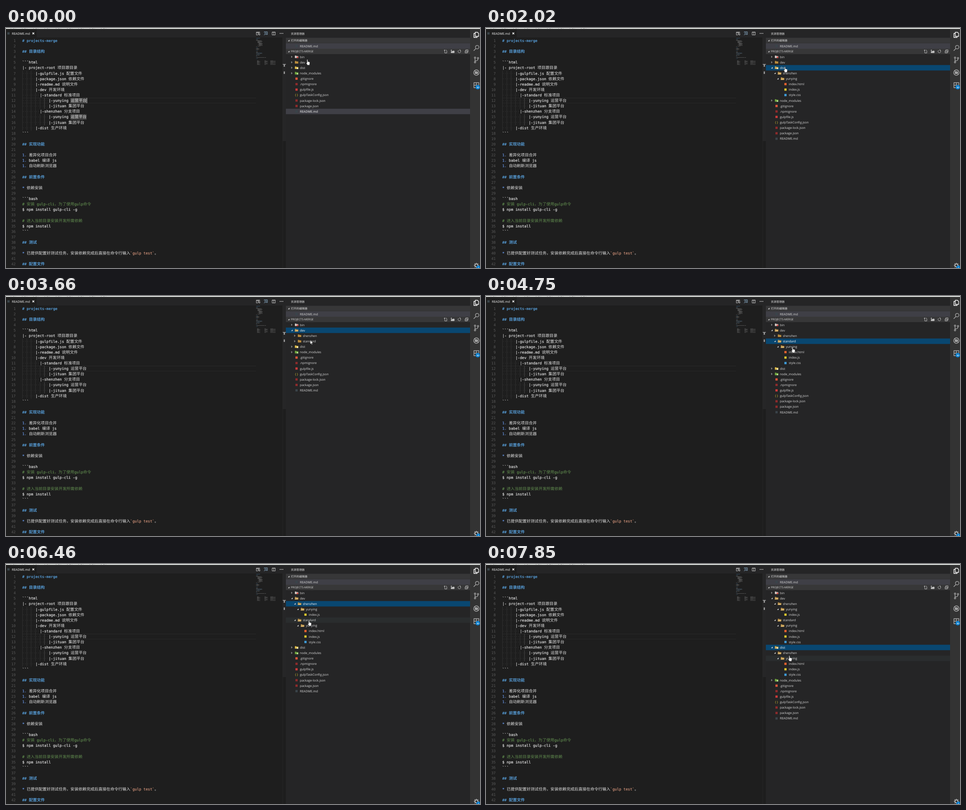
An HTML page for the animation above (7.99 s loop, 1050 px wide and 533 px high).

```html
<!DOCTYPE html>
<html lang="zh">
<head>
<meta charset="utf-8">
<title>projects-merge</title>
<style>
html, body { margin: 0; width: 100%; height: 100%; overflow: hidden; background: #1e1e1e; }
svg { display: block; }
text { white-space: pre; text-rendering: geometricPrecision; }
.code { font: 8.1px "DejaVu Sans Mono", monospace; }
.code .cjk { font: 8.83px "Noto Sans CJK SC", "Noto Sans CJK", sans-serif; }
.code .bold { font-weight: bold; }
.ui { font: 6.88px "Open Sans", "Noto Sans CJK SC", "Noto Sans CJK", sans-serif; }
.small { font-size: 6.1px; }
.line { fill: none; stroke: #c5c5c5; stroke-width: .9; }
</style>
</head>
<body>
<svg id="stage" width="1050" height="533" viewBox="0 0 1050 533"></svg>
<script>
const LOOP = 7990, PITCH = 12.13, COL = 4.876, LEFT = 36;
const BLUE = "#569cd6", TEXT = "#e2e2e2", UI = "#dcdcdc", NOTE = "#3a444a";
const stage = document.getElementById("stage");

function add(parent, tag, attrs, content) {
  const el = document.createElementNS("http://www.w3.org/2000/svg", tag);
  for (const k in attrs) el.setAttribute(k, attrs[k]);
  if (content !== undefined) el.textContent = content;
  parent.appendChild(el);
  return el;
}
const rect = (p, x, y, width, height, fill, more) => add(p, "rect", { x, y, width, height, fill, ...more });
const path = (p, d, attrs) => add(p, "path", { d, ...attrs });
const label = (p, x, y, s, fill = UI, cls = "") => add(p, "text", { x, y: y + 2.5, fill, class: "ui " + cls }, s);
const at = (p, x, y) => add(p, "g", { transform: `translate(${x} ${y})` });
const lineY = n => 28 + (n - 1) * 12.11;

// Title strip and tab bar
rect(stage, 0, 0, 1050, 533, "#1e1e1e");
rect(stage, 0, 2, 620, 19, "#252526");
rect(stage, 0, 2, 68, 19, "#1e1e1e");
rect(stage, 0, 0, 1050, 2, "#e9ece9");
path(stage, "M10 .6H222", { stroke: "#a5a8a5", "stroke-width": .8, "stroke-dasharray": "2 3 4 2 1 13" });
rect(stage, 3, 9.5, 5, 5, NOTE);
label(stage, 13, 12, "README.md", "#fff");
path(stage, "M58.5 10l4 4m0-4l-4 4", { class: "line", style: "stroke:#fff;stroke-width:1.2" });

// Editor actions
path(stage, "M554.5 9h7.5v2m-7.5-2v6.5h3.5m-3.5-5h7M558.5 9v6M560 12.5h2.5v3h-2.5z", { class: "line" });
const preview = at(stage, 575, 12);
path(preview, "M-3-2v-1.5h7v6h-2M-3.5 4l2.5-2.5", { class: "line", style: "stroke:#8fb4d0" });
add(preview, "circle", { cx: .3, cy: .3, r: 1.9, class: "line", style: "stroke:#8fb4d0" });
path(stage, "M589.5 9h7v6.5h-7zM593 9v6.5M589.5 9.5h7", { class: "line" });
for (const x of [607.3, 610.3, 613.3]) add(stage, "circle", { cx: x, cy: 12, r: .9, fill: "#d0d0d0" });

// Document
const doc = `# projects-merge

## 目录结构

\`\`\`html
|- project-root 项目跟目录
      |-gulpfile.js 配置文件
      |-package.json 依赖文件
      |-readme.md 说明文件
      |-dev 开发环境
        |-standard 标准项目
            |-yunying 运营平台
            |-jituan 集团平台
        |-shenzhen 分支项目
            |-yunying 运营平台
            |-jituan 集团平台
      |-dist 生产环境
\`\`\`

## 实现功能

1. 差异化项目合并
1. babel 编译 js
1. 自动刷新浏览器

## 前置条件

* 依赖安装

\`\`\`bash
# 安装 gulp-cli，为了使用gulp命令
$ npm install gulp-cli -g

# 进入当前目录安装开发所需依赖
$ npm install
\`\`\`

## 测试

* 已提供配置好测试任务，安装依赖完成后直接在命令行输入\`gulp test\`。

## 配置文件`.split("\n");

function segments(s, n) {
  if (n > 30 && n < 36 && s[0] === "#") return [[s, "#608b4e"]];
  if (s[0] === "#") return [[s, BLUE, "bold"]];
  const item = s.match(/^(1\.|\*)(.*?)(`.*`)?(。?)$/);
  if (item) return [[item[1], "#6796e6"], [item[2], TEXT], [item[3] || "", "#ce9178"], [item[4], TEXT]];
  return [[s, TEXT]];
}

for (const y of [155, 166.4]) rect(stage, LEFT, y, 518, .8, "#2c2c2c");
const marks = add(stage, "g", {});
for (const n of [12, 15]) rect(marks, 142.8, lineY(n) - 6, 35.6, 12, "#464646");

doc.forEach((s, i) => {
  const n = i + 1, y = lineY(n), indent = s.search(/\S|$/);
  add(stage, "text", { x: 21.5, y: y + 2.9, class: "code", fill: "#5a5a5a", "text-anchor": "end" }, n);
  for (let c = 0; c < indent; c++) {
    const x = LEFT + c * COL;
    rect(stage, x + 2, y - .4, .9, .9, "#444");
    if (c % 2 === 0) rect(stage, x, y - 6, .6, 12.1, c === 10 ? "#686868" : "#3c3c3c");
  }
  const t = add(stage, "text", { x: LEFT + indent * COL, y: y + 2.9, class: "code" });
  for (const [str, fill, weight = ""] of segments(s.trim(), n))
    for (const part of str.split(/([^\x00-\x7f]+)/)) {
      if (!part) continue;
      const latin = part < "\x7f";
      add(t, "tspan", {
        fill, class: (latin ? "" : "cjk ") + weight,
        stroke: latin && !weight ? fill : "none", "stroke-width": .2
      }, part);
    }
});
const caret = rect(stage, 178.6, 155.2, 1, 11.8, "#ddd");

// Minimap
const tail = Array.from({ length: 9 }, (_, i) =>
  "    " + "x".repeat(5 + i % 3 * 4).padEnd(30) + (i % 4 ? "xxx xxxx xxx" : "xxxxx").padEnd(24) +
  (i % 3 ? "xxxx xx xxx xxxx xxx" : "xxxx xxxxx"));
[...doc, "", "", "", ...tail].forEach((s, i) => {
  for (const word of s.matchAll(/\S+/g))
    rect(stage, 554 + word.index * .55, 22 + i * 1.11, word[0].length * .55, .7,
      s[0] === "#" ? BLUE : "#bbb", { opacity: i < doc.length ? .45 : .38 });
});

// Scrollbar and overview marks
rect(stage, 613, 21, 7, 230, "#262627");
rect(stage, 612.8, 21, .5, 512, "#343434");
rect(stage, 613, 80, 7, 1.2, "#b0b0b0");
rect(stage, 615.2, 80, 2.6, 6, "#a0a0a0");
rect(stage, 615.2, 96.5, 2.6, 5.5, "#a0a0a0");

// Sidebar
rect(stage, 620, 2, 408, 531, "#252526");
label(stage, 631, 12.5, "资源管理器", UI, "small");
for (const [y, s] of [[27.7, "打开的编辑器"], [52, "PROJECTS-MERGE"]]) {
  rect(stage, 620, y - 6, 408, 12, "#373738");
  path(stage, `M628 ${y - 1.6}v3.4h-3.4z`, { fill: "#ddd" });
  label(stage, 631, y - .2, s, UI, "small");
}
rect(stage, 620, 34, 408, 12, "#3f3f46");
rect(stage, 641, 37.5, 5, 5, NOTE);
label(stage, 651, 40, "README.md");

path(at(stage, 974, 52), "M-2-1v4.5h4.5v-5l-1.5-1.5h-1M-4-2.5h3M-2.5-4v3", { class: "line" });
path(at(stage, 989, 52), "M-3 0h3l1-1h3v4h-7zM-4-2.5h3M-2.5-4v3", { class: "line", style: "fill:#c5c5c5" });
path(at(stage, 1004.5, 52), "M1-2.6a3 3 0 1 1-2.5 0M1-4.5v2.5h2", { class: "line" });
path(at(stage, 1020, 52), "M-3-1h5v4.5h-5zM-1.5-1v-2.5h5v5h-1.5M-1.8 1.3h2.6", { class: "line" });

// Activity bar
rect(stage, 1028, 2, 22, 531, "#333");
const ring = (x, y, r) => `M${x - r} ${y}a${r} ${r} 0 1 0 ${2 * r} 0a${r} ${r} 0 1 0 ${-2 * r} 0`;
const tool = (y, d, color = "#adadad") =>
  path(at(stage, 1042, y), d, { class: "line", style: `stroke:${color};stroke-width:1.3` });
tool(15, "M-2.5-5.5h5l2.5 2.5v6.5h-7.5zM-2.5-3h-3v9h7v-2.5", "#fff");
tool(44, "M-1 1.5l-5 5" + ring(1.7, -1.5, 3.9));
tool(71, "M-3-3v6M3.5-2q0 4-6 4" + ring(-3, -5, 1.6) + ring(-3, 5, 1.6) + ring(3.5, -4, 1.6));
tool(99, "M-4-4l8 8M-4 0h8M-3.5 3l7-5" + ring(0, 0, 6) + ring(0, 0, 2.4));
tool(127, "M-5.5-5.5h11v11h-11zM-5.5 0h11M0-5.5v11");
tool(527, "M0-5.5v2.5M0 3v2.5M-5.5 0h2.5M3 0h2.5M-4-4l2 2M4-4l-2 2M-4 4l2-2M4 4l-2-2" + ring(0, 0, 3), "#c8c8c8");
for (const [x, y, r, s] of [[1045, 131.5, 5, "30"], [1046.5, 532, 4.5, "1"]]) {
  add(stage, "circle", { cx: x, cy: y, r, fill: "#007acc" });
  add(stage, "text", { x, y: y + 2, class: "ui", fill: "#fff", "text-anchor": "middle", style: "font-size:5.4px;font-weight:600" }, s);
}

// Explorer tree
const web = ["index.html", "index.js", "style.css"];
const dir = (name, ...kids) => ({ name, kids });
const files = [
  dir("bin"),
  dir("dev", dir("shenzhen", dir("yunying", "index.js")), dir("standard", dir("yunying", ...web))),
  dir("dist", dir("shenzhen", dir("yunying", ...web))),
  dir("node_modules"),
  ".gitignore", ".npmignore", "gulpfile.js", "gulpTaskConfig.json", "package-lock.json", "package.json", "README.md"
];
const folderColor = { bin: "#cfc6c2", dist: "#dcb944", node_modules: "#6fa53c" };
const badge = { bin: "#d9443f", dist: "#f4ecc8", node_modules: "#b7d99a" };
const fileColor = {
  ".gitignore": "#e0563a", ".npmignore": "#8e2b2c", "gulpfile.js": "#c93a3a", "package-lock.json": "#8e2b2c",
  "package.json": "#8e2b2c", "README.md": NOTE, "index.html": "#e4602f", "index.js": "#d9c52f", "style.css": "#3f9bd8"
};

// time, open folders, selected row, hovered row
const states = [
  [0, [], "README.md"],
  [1370, ["dist"], "dist"],
  [2270, [], "dist"],
  [2900, ["dev"], "dev"],
  [3800, ["dev", "dev/standard"], "dev/standard"],
  [5280, ["dev", "dev/standard", "dev/shenzhen"], "dev/shenzhen"],
  [5540, ["dev", "dev/standard", "dev/shenzhen"], "dev/shenzhen", "dev/standard"],
  [7300, ["dev", "dev/standard", "dev/shenzhen", "dist"], "dist"],
  [7560, ["dev", "dev/standard", "dev/shenzhen", "dist"], "dist", "dist/shenzhen/yunying"]
];

function drawFolder(g, name, open) {
  const fill = folderColor[name] || (open ? "#c89b4c" : "#b98a3c");
  path(g, "M-3.7-2.8h2.8l1 1h3.8v4.6h-7.6z", { fill });
  if (open) path(g, "M-4.3 2.8l1.4-3.4h7.2l-1.2 3.4z", { fill: "#e3bd74", stroke: "#5a4520", "stroke-width": .4 });
  if (badge[name]) rect(g, .5, -.3, 3.2, 3.2, badge[name]);
}

function drawTree(g, open, selected, hovered) {
  let y = 64;
  const isOpen = p => p.endsWith("yunying") || p === "dist/shenzhen" || open.includes(p);
  (function rows(nodes, depth, base) {
    for (const node of nodes) {
      const name = node.name || node, id = base + name, x = depth * 6.6;
      if (id === selected) rect(g, 620, y - 6, 408, 12.1, id === "README.md" ? "#3f3f46" : "#094771");
      else if (id === hovered) rect(g, 620, y - 6, 408, 12.1, "#2a2d2e");
      const icon = at(g, 643.6 + x, y);
      if (node.kids) {
        const arrow = at(g, 633 + x, y);
        if (isOpen(id)) path(arrow, "M2-1.7v3.4h-3.4z", { fill: "#ddd" });
        else path(arrow, "M-.8-2l2 2l-2 2z", { fill: "#777", stroke: "#bbb", "stroke-width": .5 });
        drawFolder(icon, name, isOpen(id));
      } else if (name === "gulpTaskConfig.json") {
        add(icon, "text", { y: 2.4, class: "ui", fill: "#d9c52f", "text-anchor": "middle" }, "{ }");
      } else {
        rect(icon, -2.5, -2.5, 5, 5, fileColor[name]);
      }
      label(g, 651 + x, y, name, id === selected ? "#fff" : UI);
      y += PITCH;
      if (node.kids && isOpen(id)) rows(node.kids, depth + 1, id + "/");
    }
  })(files, 0, "");
}
const trees = states.map(([, ...args]) => {
  const g = add(stage, "g", {});
  drawTree(g, ...args);
  return g;
});

// Pointer
const ink = { fill: "#fff", stroke: "#222", "stroke-width": .6 };
const pointer = add(stage, "g", {});
const hand = path(pointer, "M2.2.8q.9-.8 1.8 0v4.2l3.6.9q1.1.3 1 1.6l-.7 5.4h-4.6l-2.8-4.5q.1-1.3 1.7-.1z", ink);
const arrow = path(pointer, "M0 0v9l2-1.8 1.5 3 1.3-.6-1.5-2.9h2.9z", ink);

// time, x, y: jumps toward the next point in short steps
const track = [
  [0, 664.5, 69.5], [150, 664.5, 69.5], [420, 667, 100], [685, 667, 100], [820, 666, 105],
  [940, 666, 105], [1230, 659, 87], [1640, 660, 86], [1890, 660, 86], [2020, 659, 85.5],
  [2270, 659, 85.5], [2760, 658, 74], [3050, 660, 76], [3660, 674, 98], [3800, 674, 98],
  [4100, 676, 113], [4750, 676, 113], [5150, 668, 85], [5280, 668, 85], [5680, 670, 121],
  [5960, 674, 102], [6180, 680, 136], [6460, 668, 124.5], [6610, 668, 124.5], [6740, 660, 167],
  [7160, 658, 183], [7300, 658, 183], [7850, 669, 203], [LOOP, 669, 203]
];

function pointerAt(t) {
  const i = track.findIndex(k => k[0] > t);
  const [t0, x0, y0] = track[i - 1], [t1, x1, y1] = track[i];
  const steps = Math.max(1, Math.round((t1 - t0) / 137));
  const p = Math.floor((t - t0) / (t1 - t0) * steps) / steps;
  return [x0 + (x1 - x0) * p, y0 + (y1 - y0) * p];
}

const show = (el, on) => el.setAttribute("visibility", on ? "visible" : "hidden");
const between = (t, a, b) => t >= a && t < b;

function draw(now) {
  const t = now % LOOP;
  trees.forEach((g, i) => show(g, between(t, states[i][0], i + 1 < states.length ? states[i + 1][0] : LOOP)));
  show(marks, t < 1370);
  show(caret, t < 420 || between(t, 940, 1370));
  const useArrow = between(t, 3440, 4250);
  show(arrow, useArrow);
  show(hand, !useArrow);
  pointer.setAttribute("transform", `translate(${pointerAt(t).join(" ")})`);
}

const start = performance.now();
(function tick() {
  draw(performance.now() - start);
  requestAnimationFrame(tick);
})();
</script>
</body>
</html>
```
